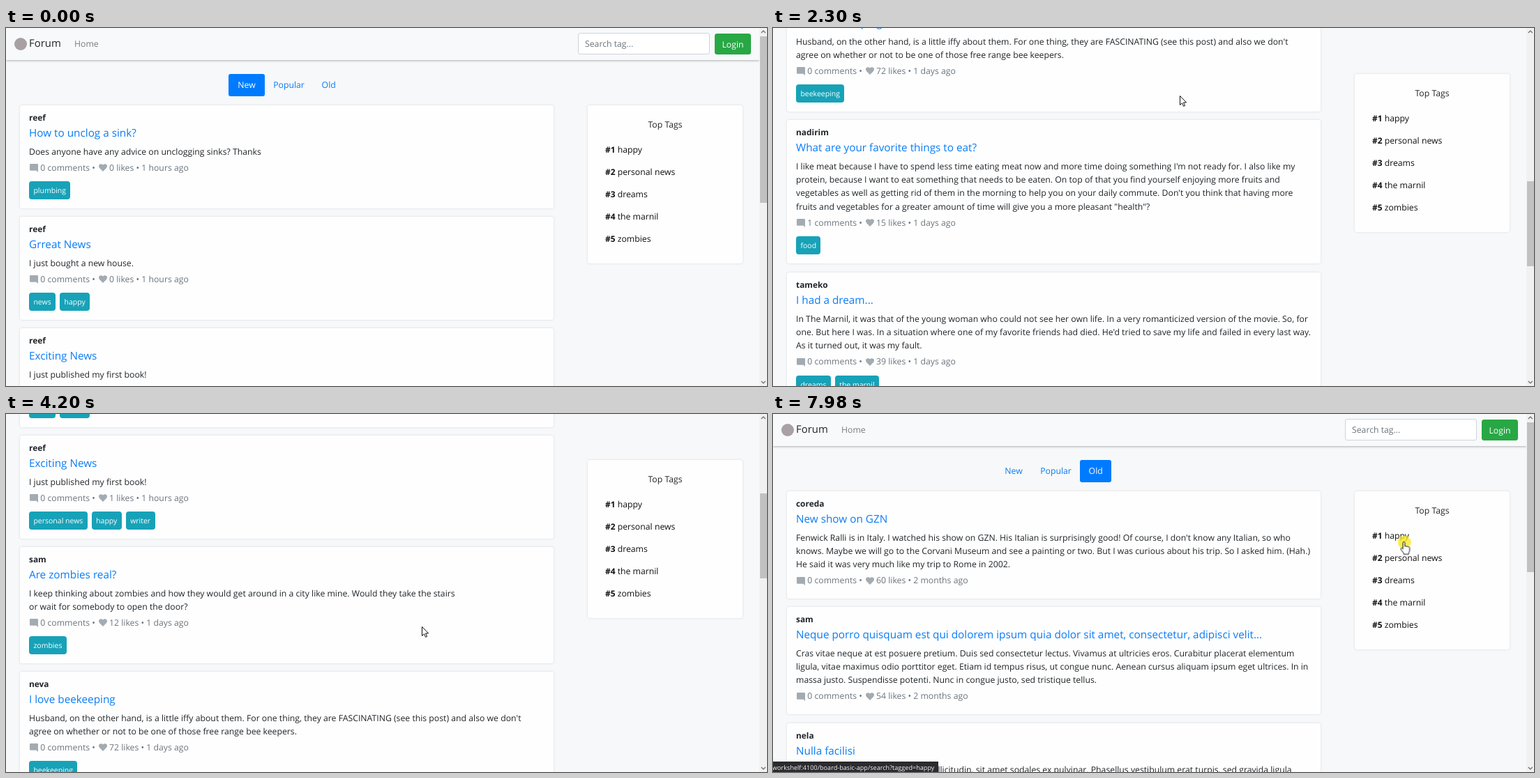
Write an HTML page that moves like this. It is 1091 px wide and 514 px high and loops after 8000 ms.

```html
<!DOCTYPE html>
<html lang="en">
<head>
<meta charset="utf-8">
<title>Forum</title>
<style>
@property --s { syntax: "<number>"; inherits: true; initial-value: 0; }
@property --k { syntax: "<number>"; inherits: true; initial-value: .5; }
html, body { margin: 0; width: 100%; height: 100%; overflow: hidden; }
body { background: #f7f8fa; }
#stage {
  position: relative; width: 1091px; height: 514px; overflow: hidden; background: #f7f8fa;
  font: 12.26px/19.4px "Open Sans", "Noto Sans", sans-serif; color: #212529;
  white-space: nowrap; text-rendering: geometricPrecision;
  animation: scroll 8s linear infinite, ratio 8s step-end infinite;
}
#stage div, #stage svg { position: absolute; box-sizing: border-box; }
svg { overflow: visible; }
b { font-size: 11.9px; font-weight: 700; }

#page { left: 0; top: 0; width: 1080px; height: 2000px; transform: translateY(calc(var(--s) * -1px)); }
#nav { left: 0; top: 0; width: 1080px; height: 46px; background: #f8f9fa; box-shadow: 0 1px 3px rgba(0,0,0,.3); }
#nav div { top: 13px; }
#nav .logo { left: 12px; top: 14px; width: 18px; height: 18px; border-radius: 50%; background: #a8a0a2; }
#nav .brand { left: 33px; font-size: 14.9px; }
#nav .home { left: 98px; color: #7c7d7d; }
#nav .field, #nav .login { top: 7px; height: 31px; border-radius: 3px; line-height: 29px; border: 1px solid #ced4da; }
#nav .field { left: 820px; width: 189px; padding-left: 9px; background: #fff; color: #6c757d; }
#nav .login { left: 1016px; top: 8px; width: 52px; height: 30px; text-align: center; background: #28a745; border-color: #28a745; color: #fff; }

.view { left: 0; top: 0; animation: 8s step-end infinite; }
.new { animation-name: new; }
.popular { animation-name: popular; }
.old { animation-name: old; }
.tab { top: 66px; height: 32px; line-height: 32px; border-radius: 3px; text-align: center; color: #0a7cf5; }
.tab.on { background: #007bff; color: #fff; }

.card { background: #fefefe; border-radius: 3px; box-shadow: 0 0 3px rgba(0,0,0,.14); }
.post { left: 20px; width: 765px; }
.post > div, .post > svg { left: 13px; }
.post .title { top: 31.2px; font-size: 15.3px; color: #0a7cf5; }
.post .stat { color: #6c757d; }
.post svg { fill: #a3abb2; }
.tags { display: flex; gap: 6px; }
.tags span { height: 25.5px; padding: 0 6.4px; border-radius: 4px; background: #17a2b8; color: #fff; font-size: 10.5px; line-height: 29.5px; }

#side { left: 834px; top: 0; width: 222px; height: 227px; transform: translateY(max(111px - var(--s) * 1px, 66px)); }
#side .head { left: 0; top: 18px; width: 100%; text-align: center; }
#rows { left: 25px; top: 54px; animation: nudge 8s step-end infinite; color: #111; }

#bar { left: 1080px; top: 0; width: 11px; height: 514px; background: #f1f1f1; }
#bar svg { left: 0; top: 0; fill: none; stroke: #777; stroke-width: 1.3; }
#thumb { left: 1px; top: calc(12px + var(--s) * var(--k) * 1px); width: 10px; height: 239px; background: #c1c1c1; animation: thumb 8s step-end infinite; }

.status { left: 0; top: 499px; height: 15px; overflow: hidden; background: #2b2a2e; color: #f4f4f4; font-size: 9.1px; line-height: 17px; text-indent: -1px; opacity: 0; animation: 8s step-end infinite; }
.short { width: 144px; animation-name: short; }
.long { width: 237px; animation-name: long; }

#pointer { left: 0; top: 0; animation: move 8s ease-in-out infinite; }
#pointer svg { left: 0; top: 0; width: 1px; height: 1px; fill: #fff; stroke: #111; stroke-linejoin: round; }
#arrow { animation: arrow 8s step-end infinite; }
#hand { animation: hand 8s step-end infinite; }
#glow { left: -9.5px; top: -9.5px; width: 19px; height: 19px; border-radius: 50%; background: rgba(248,232,30,.78); opacity: 0; animation: glow 8s step-end infinite; }

@keyframes scroll {
  0%, 18.625% { --s: 0; }
  19.35%, 19.7% { --s: 41; }
  20.125%, 22.75% { --s: 80; }
  28.7%, 29.5% { --s: 817; }
  29.875%, 32.125% { --s: 840; }
  39.75%, 45.75% { --s: 1445; }
  47.2%, 47.6% { --s: 1079; }
  50%, 55.5% { --s: 400; }
  57.25%, 100% { --s: 0; }
}
@keyframes ratio { 0% { --k: .5; } 26.2%, 100% { --k: .2546; } }
@keyframes thumb {
  0% { height: 239px; }
  26.2% { height: 122px; }
  72% { height: 223px; }
  83%, 100% { height: 215px; }
}
@keyframes new { 0% { opacity: 1; } 72%, 100% { opacity: 0; } }
@keyframes popular { 0% { opacity: 0; } 72% { opacity: 1; } 83%, 100% { opacity: 0; } }
@keyframes old { 0% { opacity: 0; } 83%, 100% { opacity: 1; } }
@keyframes nudge { 0% { transform: none; } 57.25% { transform: translateY(1px); } 60%, 100% { transform: none; } }
@keyframes short { 0% { opacity: 0; } 68.6% { opacity: 1; } 87.4%, 100% { opacity: 0; } }
@keyframes long { 0% { opacity: 0; } 94.5%, 100% { opacity: 1; } }
@keyframes arrow { 0% { opacity: 1; } 68.25% { opacity: 0; } 87.25% { opacity: 1; } 94.25%, 100% { opacity: 0; } }
@keyframes hand { 0% { opacity: 0; } 68.25% { opacity: 1; } 87.25% { opacity: 0; } 94.25%, 100% { opacity: 1; } }
@keyframes glow {
  0% { opacity: 0; }
  70.875% { opacity: 1; }
  73.1% { opacity: 0; }
  81.375% { opacity: 1; }
  83.75% { opacity: 0; }
  99.7%, 100% { opacity: 1; }
}
@keyframes move {
  0%, 3% { transform: translate(1078px, 516px); }
  6.875%, 9.125% { transform: translate(643px, 224px); }
  12.5%, 14.375% { transform: translate(555px, 67px); }
  16.25%, 22.75% { transform: translate(581px, 99px); }
  28.7%, 45.75% { transform: translate(583px, 97px); }
  47.2%, 47.6% { transform: translate(582px, 119px); }
  50%, 52.5% { transform: translate(596px, 305px); }
  53.625%, 59.875% { transform: translate(485px, 220px); }
  63.625%, 65.625% { transform: translate(571px, 94px); }
  69%, 78.5% { transform: translate(412px, 76px); }
  81.25%, 86.5% { transform: translate(469.5px, 79.5px); }
  95.125%, 100% { transform: translate(904.5px, 183.5px); }
}
</style>
</head>
<body>
<div id="stage">
  <div id="page">
    <div id="nav">
      <div class="logo"></div>
      <div class="brand">Forum</div>
      <div class="home">Home</div>
      <div class="field">Search tag...</div>
      <div class="login">Login</div>
    </div>
  </div>
  <div id="side" class="card">
    <div class="head">Top Tags</div>
    <div id="rows"></div>
  </div>
  <div id="bar">
    <div id="thumb"></div>
    <svg width="11" height="514"><path d="M2.8 7 5.8 4l3 3M2.8 507l3 3 3-3"/></svg>
  </div>
  <div class="status short">workshelf:4100/board-basic-app#</div>
  <div class="status long">workshelf:4100/board-basic-app/search?tagged=happy</div>
  <div id="pointer">
    <div id="glow"></div>
    <svg id="arrow"><path d="M.5.5v13l3-2.8 2.1 4.7 2-.9-2-4.6h4z"/></svg>
    <svg id="hand"><path d="M-1.4 10V1.4a1.4 1.4 0 0 1 2.8 0V6.5q1.4-.9 2.5.3 1.4-.7 2.4.5 1.8-.4 1.9 1.4v3.6q0 2-1.4 3.6v2H-.2v-1.6L-4 11.5q-1.4-2 .4-2.5 1.2 0 2.2 1.2z"/></svg>
  </div>
</div>
<script>
const LINE = 19.4;
const post = (user, title, lines, comments, likes, age, tags = []) =>
  ({ user, title, lines, comments, likes, age, tags });

const sink = post("reef", "How to unclog a sink?",
  ["Does anyone have any advice on unclogging sinks? Thanks"], 0, 0, "1 hours", ["plumbing"]);
const house = post("reef", "Grreat News",
  ["I just bought a new house."], 0, 0, "1 hours", ["news", "happy"]);
const book = post("reef", "Exciting News",
  ["I just published my first book!"], 0, 1, "1 hours", ["personal news", "happy", "writer"]);
const zombies = post("sam", "Are zombies real?",
  ["I keep thinking about zombies and how they would get around in a city like mine. Would they take the stairs",
   "or wait for somebody to open the door?"], 0, 12, "1 days", ["zombies"]);
const bees = post("neva", "I love beekeeping",
  ["Husband, on the other hand, is a little iffy about them. For one thing, they are FASCINATING (see this post) and also we don't",
   "agree on whether or not to be one of those free range bee keepers."], 0, 72, "1 days", ["beekeeping"]);
const food = post("nadirim", "What are your favorite things to eat?",
  ["I like meat because I have to spend less time eating meat now and more time doing something I'm not ready for. I also like my",
   "protein, because I want to eat something that needs to be eaten. On top of that you find yourself enjoying more fruits and",
   "vegetables as well as getting rid of them in the morning to help you on your daily commute. Don't you think that having more",
   "fruits and vegetables for a greater amount of time will give you a more pleasant \"health\"?"], 1, 15, "1 days", ["food"]);
const dream = post("tameko", "I had a dream...",
  ["In The Marnil, it was that of the young woman who could not see her own life. In a very romanticized version of the movie. So, for",
   "one. But here I was. In a situation where one of my favorite friends had died. He'd tried to save my life and failed in every last way.",
   "As it turned out, it was my fault."], 0, 39, "1 days", ["dreams", "the marnil"]);
const nulla = post("nela", "Nulla facilisi",
  ["Curabitur aliquam nunc ut lectus sollicitudin, sit amet sodales ex pulvinar. Phasellus vestibulum erat turpis, sed gravida ligula",
   "euismod at. Orci varius natoque penatibus et magnis dis parturient montes, nascetur ridiculus mus. Pellentesque ut congue",
   "mauris. Donec vestibulum velit in purus consequat viverra."], 0, 55, "2 months", ["latin"]);
const neque = post("sam", "Neque porro quisquam est qui dolorem ipsum quia dolor sit amet, consectetur, adipisci velit...",
  ["Cras vitae neque at est posuere pretium. Duis sed consectetur lectus. Vivamus at ultricies eros. Curabitur placerat elementum",
   "ligula, vitae maximus odio porttitor eget. Etiam id tempus risus, ut congue nunc. Aenean cursus aliquam ipsum eget ultrices. In in",
   "massa justo. Suspendisse potenti. Nunc in congue justo, sed tristique tellus."], 0, 54, "2 months");
const show = post("coreda", "New show on GZN",
  ["Fenwick Ralli is in Italy. I watched his show on GZN. His Italian is surprisingly good! Of course, I don't know any Italian, so who",
   "knows. Maybe we will go to the Corvani Museum and see a painting or two. But I was curious about his trip. So I asked him. (Hah.)",
   "He said it was very much like my trip to Rome in 2002."], 0, 60, "2 months");

const bubble = "M0 1.2Q0 0 1.2 0h9.6Q12 0 12 1.2V12L9.5 9.7H1.2Q0 9.7 0 8.500z";
const heart = "M6 11 1 6Q-1 3 1 1q2.600-2 5 .6Q8.400-1 11 1q2 2 0 5z";
const icon = (d, x, y) => `<svg width="12" height="12" style="left:${x}px;top:${y}px"><path d="${d}"/></svg>`;
const text = (cls, x, y, body) => `<div class="${cls}" style="left:${x}px;top:${y}px">${body}</div>`;

function card(p, top) {
  const extra = (p.lines.length - 1) * LINE;
  const pitch = 160 + extra - (p.tags.length ? 0 : 32.3);
  const body = p.lines.map((l, i) => text("line", 13, 56.6 + i * LINE, l)).join("");
  const tags = p.tags.map(t => `<span>${t}</span>`).join("");
  const html = `<div class="card post" style="top:${Math.floor(top)}px;height:${pitch - 12.5}px">
    ${text("user", 13, 7.6, `<b>${p.user}</b>`)}<div class="title">${p.title}</div>${body}
    ${icon(bubble, 13.5, 84 + extra)}${text("stat", 29.3, 79.6 + extra, `${p.comments} comments •`)}
    ${icon(heart, 112.5, 84 + extra)}${text("stat", 128, 79.6 + extra, `${p.likes} likes • ${p.age} ago`)}
    ${text("tags", 13, 109 + extra, tags)}</div>`;
  return { html, pitch };
}

const tabs = [["New", 319, 52], ["Popular", 371, 69], ["Old", 440, 45.4]];

function view(active, posts) {
  let top = 111;
  let html = tabs.map(([name, x, w]) =>
    `<div class="tab${name === active ? " on" : ""}" style="left:${x}px;width:${w}px">${name}</div>`).join("");
  for (const p of posts) {
    const c = card(p, top);
    html += c.html;
    top += c.pitch;
  }
  return `<div class="view ${active.toLowerCase()}">${html}</div>`;
}

document.getElementById("page").insertAdjacentHTML("beforeend",
  view("New", [sink, house, book, zombies, bees, food, dream, nulla, neque, show]) +
  view("Popular", [bees, show, nulla, neque, dream]) +
  view("Old", [show, neque, nulla, dream, food]));

document.getElementById("rows").innerHTML =
  ["happy", "personal news", "dreams", "the marnil", "zombies"]
    .map((t, i) => text("row", 0, i * 32.1, `<b>#${i + 1}</b> ${t}`)).join("");
</script>
</body>
</html>
```
